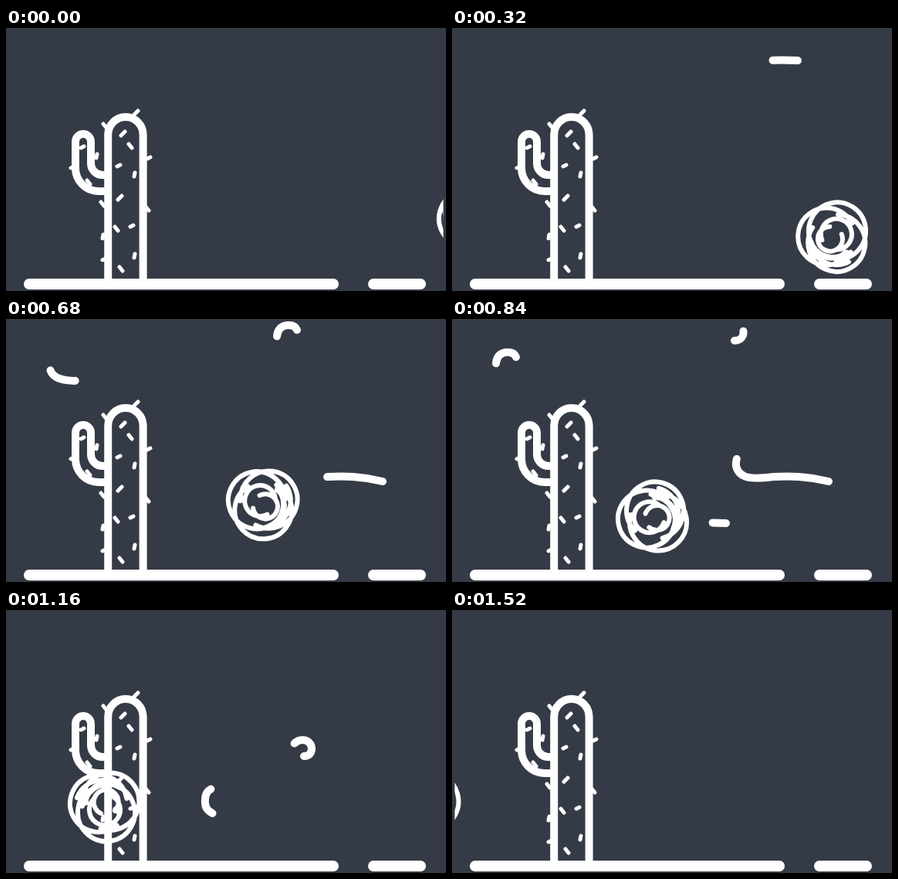
An HTML page for the animation above (1.56 s loop, 570 by 340 pixels).

```html
<!DOCTYPE html>
<html lang="en">
<head>
<meta charset="utf-8">
<title>Tumbleweed</title>
<style>
  html, body { margin: 0; width: 100%; height: 100%; overflow: hidden; background: #353b46; }
  svg { display: block; }
</style>
</head>
<body>
<svg width="570" height="340" viewBox="0 0 570 340" fill="none" stroke="#fff" stroke-linecap="round" stroke-linejoin="round">
  <defs><clipPath id="view"><rect x="3.5" width="563" height="340"/></clipPath></defs>
  <path stroke-width="14" d="M30 331H424M476 331H537"/>
  <g stroke-width="10" stroke-linecap="butt">
    <path d="M132.2 326V138A22.7 23 0 0 1 177.6 138V326"/>
    <path d="M132 211H120A30 30 0 0 1 90 181V147A10 10 0 0 1 110 147V175A15 15 0 0 0 125 190H132"/>
  </g>
  <path id="spines" stroke-width="5"/>
  <g id="gusts" stroke-width="10"></g>
  <g clip-path="url(#view)"><path id="weed" stroke-width="6"/></g>
</svg>
<script>
const LOOP = 1560, STEP = 40, TAU = 2 * Math.PI;
const $ = id => document.getElementById(id);
const clamp = k => Math.min(1, Math.max(0, k));
const easeOut = k => 1 - (1 - clamp(k)) ** 1.3;

// Cactus spines: one short stroke per direction, repeated at its start points.
const spines = {
  'l5-5': '149 139,145 222,166 112',
  'l4 5': '159 150,141 257,147 309,123 225,105 197,126 124,181 231',
  'l4-2': '144 179,161 257,183 169,125 300,97 155,84 181',
  'l-1 5': '167 187,167 292,126 267,118 163'
};
$('spines').setAttribute('d', Object.entries(spines)
  .map(([stroke, spots]) => spots.split(',').map(p => 'M' + p + stroke).join('')).join(''));

// Gusts: a stroke whose head runs ahead of its tail along a swirl.
const small = 'M448 42C430 41 412 41 394 44C382 46 352 46 351 28C350 14 356 8 366 8C376 8 379 15 377 21C375 26 372 28 366 28';
const large = 'M488 210C460 203 438 203 416 204C392 207 372 208 368 190C367 178 374 168 384 168C394 168 398 177 395 184C393 188 390 189 386 189';
const quick = { head: 235, headTime: 560, tail: 320, tailTime: 645 };
const slow = { head: 523, headTime: 516, tail: 840, tailTime: 480 };

function gust(d, pace, delay = 0, x = 0, y = 0) {
  const el = document.createElementNS('http://www.w3.org/2000/svg', 'path');
  el.setAttribute('d', d);
  el.setAttribute('transform', `translate(${x} ${y})`);
  $('gusts').append(el);
  const size = el.getTotalLength();
  return t => {
    const s = t - delay;
    const head = size * easeOut((s - pace.head) / pace.headTime);
    const tail = size * easeOut((s - pace.tail) / pace.tailTime);
    el.style.display = head > 0 && tail < size ? '' : 'none';
    el.setAttribute('stroke-dasharray', `${Math.max(.01, head - tail)} ${2 * size}`);
    el.setAttribute('stroke-dashoffset', -tail);
  };
}

const gusts = [
  gust(small, quick),
  gust(small, quick, 160, -294, 35),
  gust(small, quick, 560, -93, 222),
  gust(large, slow)
];

// Tumbleweed: arcs of circles set off centre by `off` towards `dir` (degrees).
const polar = (r, deg) => [r * Math.cos(deg * TAU / 360), r * Math.sin(deg * TAU / 360)];

function arc(off, dir, r, from, sweep) {
  const [cx, cy] = polar(off, dir);
  const at = deg => {
    const [x, y] = polar(r, deg);
    return `${(cx + x).toFixed(2)} ${(cy + y).toFixed(2)}`;
  };
  return `M${at(from)}A${r} ${r} 0 ${sweep > 180 ? 1 : 0} 1 ${at(from + sweep)}`;
}

let weed = '';
for (let i = 0; i < 3; i++) {
  const dir = 165 + 120 * i;
  weed += arc(9, dir, 37, dir - 150, 300);
  weed += arc(4, 120 * i, 25 + 5 * i, 10 * i - 95, 110);
}
for (let i = 0; i < 2; i++) weed += arc(5, 180 - 170 * i, 20 - 4 * i, 20 + 180 * i, 290);
$('weed').setAttribute('d', weed);

const HOP = 725, LANDING = 265, SPIN = -.265;

function rollTo(t) {
  const u = (t - LANDING) / HOP;
  const entry = 24 * clamp(1 - t / 320) ** 2;
  const x = 632.5 - .438 * t + 4 * Math.sin(TAU * u) - entry;
  const y = 275 - 38 * Math.abs(Math.sin(Math.PI * u)) ** 1.4;
  $('weed').setAttribute('transform', `translate(${x} ${y}) rotate(${SPIN * (t - 840)})`);
}

function draw(t) {
  rollTo(t);
  gusts.forEach(blow => blow(t));
}

const start = performance.now();
function tick() {
  const t = (performance.now() - start) % LOOP;
  draw(Math.floor(t / STEP) * STEP);
  requestAnimationFrame(tick);
}
tick();
</script>
</body>
</html>
```
